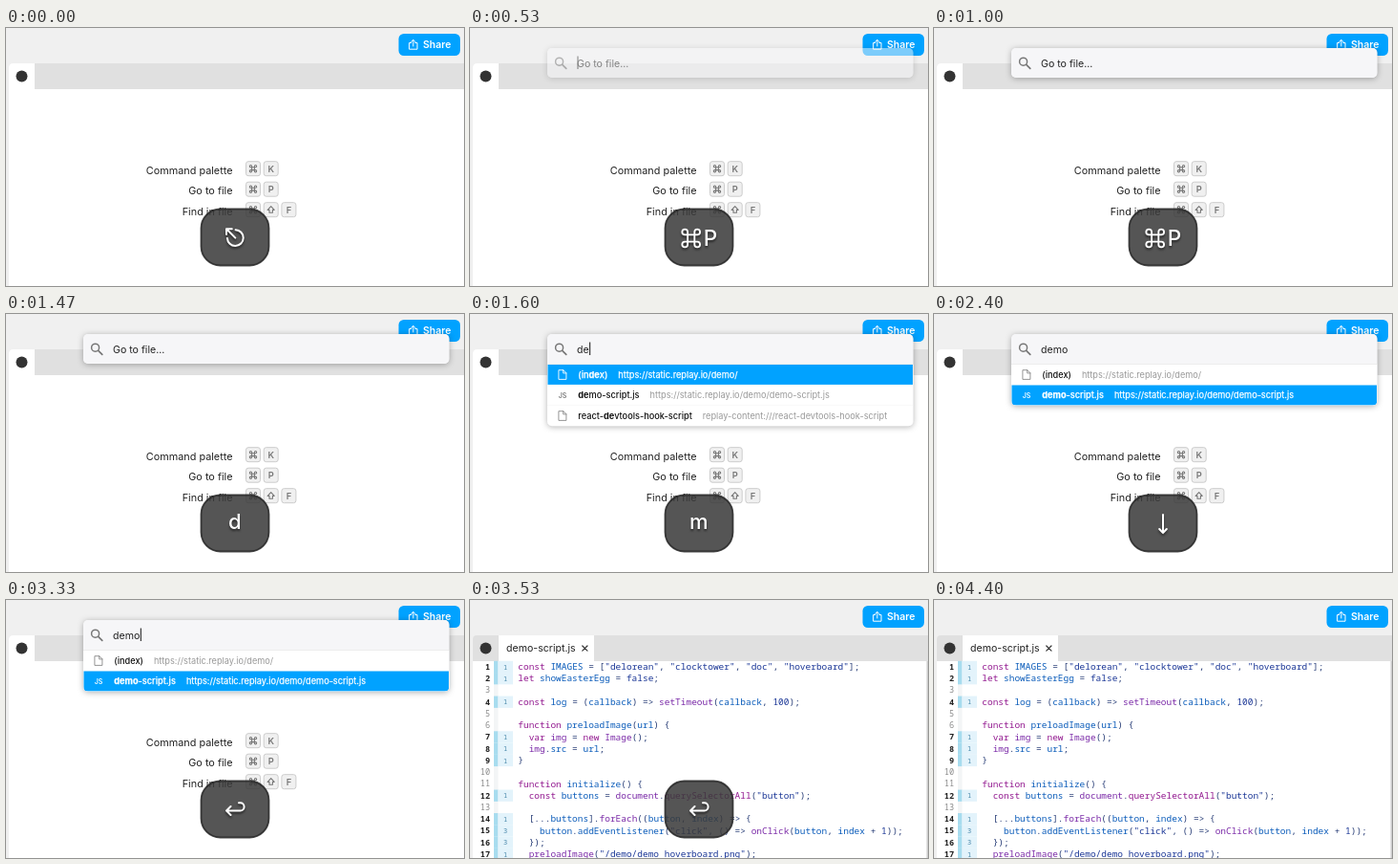
Write an HTML page that moves like this. It is 480 px wide and 270 px high and loops after 6.27 s.

```html
<!DOCTYPE html>
<html lang="en">
<head>
<meta charset="utf-8">
<title>Go to file</title>
<style>
  html, body { margin: 0; width: 100%; height: 100%; overflow: hidden; background: #f0f0f0; }
  svg { display: block; width: 480px; height: 270px; font-family: Inter, sans-serif; }
  .mono { font-family: "Noto Sans Mono", "DejaVu Sans Mono", monospace; font-size: 9.47px; font-weight: 500; }
  .line { fill: none; stroke-linecap: round; stroke-linejoin: round; }
  .panel { filter: drop-shadow(0 1px 3px rgba(0, 0, 0, .3)); }
  .glyph { filter: drop-shadow(0 2px 1px rgba(0, 0, 0, .55)); }
</style>
</head>
<body>
<svg id="stage" viewBox="0 0 480 270"></svg>
<script>
const LOOP = 6270;
const BLUE = "#01a2ff";
const stage = document.getElementById("stage");

function add(parent, tag, attrs = {}, text) {
  const node = document.createElementNS("http://www.w3.org/2000/svg", tag);
  for (const key in attrs) node.setAttribute(key, attrs[key]);
  if (text !== undefined) node.textContent = text;
  parent.append(node);
  return node;
}
const group = (parent, attrs) => add(parent, "g", attrs);
const rect = (parent, x, y, width, height, fill, more) =>
  add(parent, "rect", { x, y, width, height, fill, ...more });
const label = (parent, x, y, text, size, fill, more) =>
  add(parent, "text", { x, y, "font-size": size, fill, ...more }, text);
const line = (parent, d, stroke, width, more) =>
  add(parent, "path", { d, stroke, "stroke-width": width, class: "line", ...more });

// Looped square, s is half of the inner square.
function command(parent, x, y, s, stroke, width) {
  const r = s * .8, a = `a${r} ${r} 0 1 1 `;
  line(parent, `M${-s} ${-s}H${s}V${s}H${-s}Z` +
    `M${-s} ${-s}h${-r}${a}${r} ${-r}z M${s} ${-s}v${-r}${a}${r} ${r}z` +
    `M${s} ${s}h${r}${a}${-r} ${r}z M${-s} ${s}v${r}${a}${-r} ${-r}z`,
    stroke, width, { transform: `translate(${x} ${y})` });
}

// Window frame
rect(stage, 0, 0, 480, 270, "#f0f0f0");
rect(stage, 3, 64, 477, 206, "#fff");
add(stage, "path", { d: "M3 64V41q0-4 4-4H480V64Z", fill: "#e0e0e0" });
const logoCell = add(stage, "path", { d: "M3 64V41q0-4 4-4H30V64Z", fill: "#fff" });
add(stage, "circle", { cx: 16.5, cy: 50.5, r: 6, fill: "#333" });

rect(stage, 411.5, 6, 64.5, 23, BLUE, { rx: 5.5 });
line(stage, "M424.6 15.5H422.6V22.2H431V15.5H429M426.8 19V12.6M424.6 14.6L426.8 12.4L429 14.6", "#fff", 1);
label(stage, 437, 21.3, "Share", 10.5, "#fff", { "font-weight": 600 });

// Shortcut list
const hints = group(stage);
[["Command palette", "⌘K"], ["Go to file", "⌘P"], ["Find in file", "⌘⇧F"]].forEach(([name, keys], i) => {
  const y = 147.2 + i * 21.5;
  label(hints, 237.5, y + 5.4, name, 10.85, "#222", { "text-anchor": "end" });
  [...keys].forEach((key, k) => {
    const x = 259 + k * 18.7;
    rect(hints, x - 7.5, y - 7.5, 15, 15, "#f0f0f0", { rx: 2.5, stroke: "#ccc", "stroke-width": 1 });
    if (key === "⌘") command(hints, x, y, 1.4, "#777", 1.1);
    else if (key === "⇧") line(hints, `M${x} ${y - 3.5}l3.5 3.7h-1.8v2.8h-3.4v-2.8h-1.8z`, "#777", 1.1);
    else label(hints, x, y + 3.4, key, 9.3, "#777", { "text-anchor": "middle", "font-weight": 600 });
  });
});

// Editor
const code = [
  'const IMAGES = ["delorean", "clocktower", "doc", "hoverboard"];',
  "let showEasterEgg = false;",
  "",
  "const log = (callback) => setTimeout(callback, 100);",
  "",
  "function preloadImage(url) {",
  "  var img = new Image();",
  "  img.src = url;",
  "}",
  "",
  "function initialize() {",
  '  const buttons = document.querySelectorAll("button");',
  "",
  "  [...buttons].forEach((button, index) => {",
  '    button.addEventListener("click", () => onClick(button, index + 1));',
  "  });",
  '  preloadImage("/demo/demo_hoverboard.png");'
];
const hits = { 1: 1, 2: 1, 4: 1, 7: 1, 8: 1, 9: 1, 12: 1, 14: 1, 15: 3, 16: 3, 17: 1 };
const inks = ["#92188f", "#1a3696", "#7b2ba8", "#0b5cba", "#2a3f78"];
const token = /(\b(?:const|let|function|var|new|querySelectorAll)\b)|("[^"]*"|\b\d+\b|\bfalse\b)|((?<!function )\b(?:setTimeout|Image|document|preloadImage|forEach|onClick|img)\b)|([A-Za-z]+)|([^A-Za-z"\d]+)/g;

const editor = group(stage);
rect(editor, 30, 37, 100, 27, "#fff");
label(editor, 38, 54.3, "demo-script.js", 10.6, "#222");
line(editor, "M117.8 48l5.2 5.2M123 48l-5.2 5.2", "#333", 1.2);
rect(editor, 25, 64, 4.5, 206, "#f3f5f6");
rect(editor, 478.5, 64, 1.5, 206, "#d0d0d0");
code.forEach((source, i) => {
  const n = i + 1, y = 69.9 + i * 12.25, hit = hits[n];
  if (hit) {
    rect(editor, 25, y - 6.1, 4.5, 12.3, "#a8dcef");
    rect(editor, 29.5, y - 6.1, 15.5, 12.3, "#e3f3fb");
    label(editor, 37, y + 2.7, hit, 7, "#4585a8", { class: "mono", style: "font-size:7px", "text-anchor": "middle" });
  }
  label(editor, 21, y + 3, n, 8.5, hit ? "#222" : "#888",
    { class: "mono", style: `font-size:8.5px;font-weight:${hit ? 600 : 400}`, "text-anchor": "end" });
  const indent = source.search(/\S|$/);
  const row = add(editor, "text", { x: 50.3 + indent * 5.68, y: y + 3.3, class: "mono" });
  for (const m of source.slice(indent).matchAll(token)) {
    add(row, "tspan", { fill: inks[m.slice(1).findIndex(Boolean)] }, m[0]);
  }
});

// Search palette
const palette = group(stage);
const clip = add(add(stage, "clipPath", { id: "round" }), "rect", { x: 81, y: 21, width: 383.5, rx: 5 });
const backing = rect(palette, 81, 21, 383.5, 31, "#f6f6f8", { rx: 5, class: "panel" });
const inner = group(palette, { "clip-path": "url(#round)" });
const files = [
  ["(index)", "https://static.replay.io/demo/"],
  ["demo-script.js", "https://static.replay.io/demo/demo-script.js"],
  ["react-devtools-hook-script", "replay-content:///react-devtools-hook-script"]
];

function drawPalette({ text, caret, picked }) {
  inner.replaceChildren();
  const rows = !text ? [] : files.slice(0, text.length > 2 ? 2 : 3);
  const height = rows.length ? 31.7 + rows.length * 21.5 : 31;
  clip.setAttribute("height", height);
  backing.setAttribute("height", height);
  rect(inner, 81, 21, 383.5, height, "#f6f6f8");
  add(inner, "circle", { cx: 93.6, cy: 35.2, r: 4, class: "line", stroke: "#777", "stroke-width": 1.5 });
  line(inner, "M96.7 38.3L100.8 42.4", "#777", 1.7);
  const input = label(inner, 112, 40.8, text || "Go to file...", 10.6, "#222");
  if (caret) {
    const end = 112.5 + (text ? input.getComputedTextLength() : 0);
    rect(inner, end, 29.5, 1, 13.5, "#111");
  }
  if (rows.length) rect(inner, 81, 52.2, 383.5, height, "#e2e2e2");
  rows.forEach(([name, url], i) => {
    const y = 52.7 + i * 21.5, on = i === picked;
    rect(inner, 81, y, 383.5, 21.5, "#fff");
    if (on) rect(inner, 81.5, y + .3, 382.5, 20.9, BLUE);
    if (i === 1) {
      label(inner, 97, y + 13.3, "JS", 7, on ? "#fff" : "#777", { "text-anchor": "middle", "font-weight": 600 });
    } else {
      line(inner, `M93.3 ${y + 6}h4.6l3 3v6.7h-7.6zM97.7 ${y + 6}v3.2h3.2`, on ? "#fff" : "#888", .9);
    }
    const row = add(inner, "text", {
      x: 113.3, y: y + 13.8, "font-size": 9.2, stroke: on ? "#fff" : "none", "stroke-width": .25
    });
    const at = name.indexOf(text);
    const parts = at < 0 ? [name] : [name.slice(0, at), text, name.slice(at + text.length)];
    parts.forEach((part, k) => {
      if (part) add(row, "tspan", { fill: on ? "#fff" : "#111", "font-weight": k === 1 ? 700 : 500 }, part);
    });
    add(row, "tspan", { dx: 11, fill: on ? "#fff" : "#999" }, url);
  });
}

// Keystroke badge
const badge = group(stage);
rect(badge, 204.5, 189.5, 71, 59, "#3a3a3a", {
  rx: 20, "fill-opacity": .86, stroke: "#262626", "stroke-opacity": .85, "stroke-width": 1.8
});
const glyph = group(badge, { class: "glyph", "font-weight": 500 });
const strokes = {
  esc: "M240.6 211.2A8.4 8.4 0 1 1 231.9 220M240.3 219.6L231 210.3M231 216V210.2H236.8",
  down: "M240 210V229M236.2 225L240 229.2L243.8 225",
  enter: "M244 212.3H245.5A4.1 4.1 0 0 1 245.5 220.5H231M235.5 216L231 220.5L235.5 225"
};
function drawKey(key) {
  glyph.replaceChildren();
  if (strokes[key]) line(glyph, strokes[key], "#fff", 2);
  else if (key === "cmdP") {
    command(glyph, 231.7, 220, 3.6, "#fff", 1.9);
    label(glyph, 244.8, 228, "P", 22.5, "#fff");
  } else label(glyph, 239.8, 225.3, key, 22, "#fff", { "text-anchor": "middle" });
}

// Each step lists only what changes.
const steps = [
  [0, { key: "esc", badge: 1, palette: 0, text: "", caret: true, picked: 0, editor: false }],
  [200, { key: "cmdP" }],
  [470, { palette: .2 }],
  [530, { palette: .5 }],
  [600, { palette: .75 }],
  [670, { palette: .92 }],
  [730, { palette: 1 }],
  [1000, { caret: false }],
  [1470, { key: "d" }],
  [1530, { key: "e", text: "d", caret: true }],
  [1600, { key: "m", text: "de" }],
  [1670, { key: "o", text: "dem" }],
  [1800, { text: "demo" }],
  [2330, { key: "down", caret: false }],
  [2400, { picked: 1 }],
  [2800, { caret: true }],
  [3330, { key: "enter" }],
  [3530, { palette: 0, editor: true }],
  [4330, { badge: .5 }],
  [4400, { badge: 0 }]
];

let shown = -1;
function show(time) {
  const t = time % LOOP;
  const index = steps.findLastIndex(([at]) => at <= t);
  if (index === shown) return;
  shown = index;
  const state = Object.assign({}, ...steps.slice(0, index + 1).map(step => step[1]));
  editor.style.display = state.editor ? "" : "none";
  hints.style.display = logoCell.style.display = state.editor ? "none" : "";
  palette.style.opacity = state.palette;
  badge.style.opacity = state.badge;
  drawPalette(state);
  drawKey(state.key);
}

const start = performance.now();
function tick() {
  show(Math.max(0, performance.now() - start));
  requestAnimationFrame(tick);
}
tick();
</script>
</body>
</html>
```
